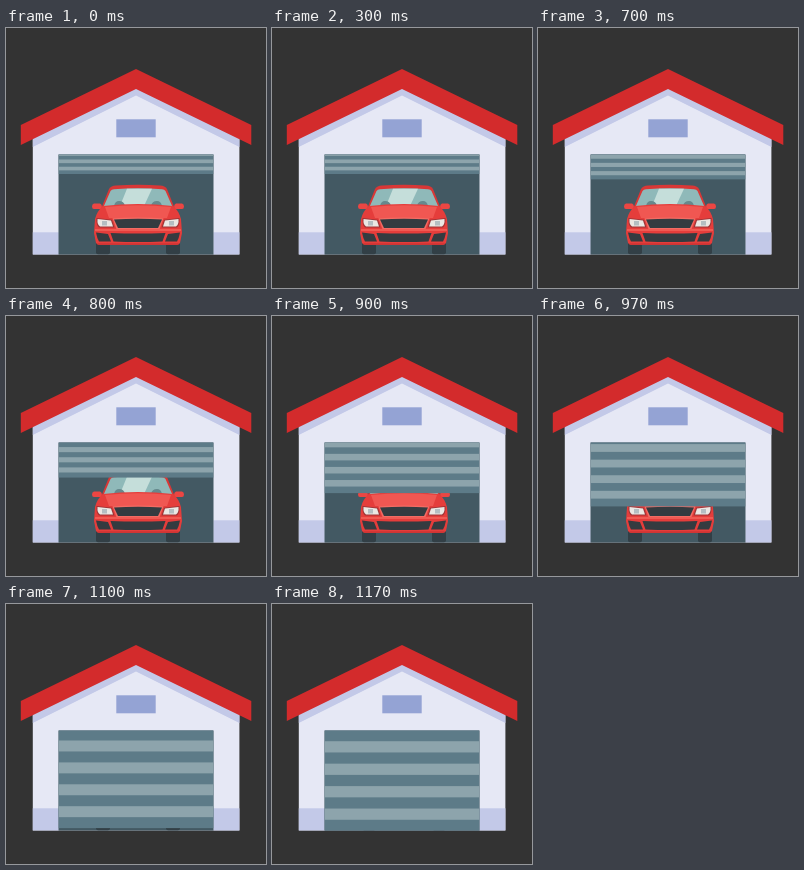
An HTML page with a canvas that plays this animation: 260 px wide and 260 px high, repeating every 2.21 s.

```html
<!DOCTYPE html>
<html lang="en">
<head>
<meta charset="utf-8">
<title>Garage door</title>
<style>
html, body { margin: 0; width: 100%; height: 100%; overflow: hidden; background: #333; }
canvas { display: block; width: 260px; height: 260px; }
</style>
</head>
<body>
<canvas id="stage"></canvas>
<script>
const SIZE = 260, LOOP = 2210, FPS = 30;
const OPENING = { x: 52.5, y: 126.5, w: 155, h: 100 };
const SLATS = 9, CAR_X = 132;

const canvas = document.getElementById('stage');
const ctx = canvas.getContext('2d');
const ratio = window.devicePixelRatio || 1;
canvas.width = canvas.height = SIZE * ratio;
ctx.scale(ratio, ratio);

function rect(color, x, y, w, h) {
  ctx.fillStyle = color;
  ctx.fillRect(x, y, w, h);
}

function shape(color, d) {
  ctx.fillStyle = color;
  ctx.fill(new Path2D(d));
}

// Draws a shape on both sides of the car's centre line.
function pair(color, d) {
  shape(color, d);
  ctx.save();
  ctx.translate(2 * CAR_X, 0);
  ctx.scale(-1, 1);
  shape(color, d);
  ctx.restore();
}

function drawHouse() {
  rect('#333333', 0, 0, SIZE, SIZE);
  shape('#e6e8f5', 'M26.8 226.4V110L130 58L233.4 110V226.4Z');
  shape('#c3c9e8', 'M26.8 110L130 58L233.4 110V119L130 67.5L26.8 119Z');
  shape('#d32b2c', 'M130 41L245.3 97V117L130 61L14.8 117V97Z');
  rect('#94a3d4', 110.3, 91.3, 39.4, 18);
  rect('#c3c9e8', 26.8, 204.3, 26, 22.1);
  rect('#c3c9e8', 207.4, 204.3, 26, 22.1);
  rect('#435963', OPENING.x, OPENING.y, OPENING.w, OPENING.h);
}

function drawCar() {
  // wheels
  pair('#323f46', 'M90 211H104V224.5Q104 226.3 102 226.3H92Q90 226.3 90 224.5Z');
  // mirrors
  pair('#b92c2e', 'M93 179L99 178V181L94 181Z');
  pair('#ec4643', 'M88 175.5H94Q96 176 96 179V181H88Q86 181 86 178.5Q86 176 88 175.5Z');
  // cabin
  shape('#d93736', 'M95 181L103 161Q105 158 110 157.6Q132 156 154 157.6Q159 158 161 161L169 181Z');
  shape('#8fb9b9', 'M97.5 179L104.5 163Q105.5 161.5 108 161.2Q132 159.5 156 161.2Q158.5 161.5 159.5 163L166.5 179Z');
  shape('#c5deda', 'M114 178L121 160.8H146L138 178Z');
  shape('#66898d', 'M108 178Q109 173 113 173Q118 173 119 178ZM145 178Q146 173 151 173Q155 173 156 178Z');
  // body
  shape('#e53d3b', 'M97 178Q132 174 167 178Q173 183 175 191L176 205L174 215Q173 217 170 217H94Q91 217 90 215L88 205L89 191Q91 183 97 178Z');
  shape('#f05752', 'M99 179Q132 175.5 165 179L161 190H103Z');
  // headlights
  pair('#9c3436', 'M90.5 190L106 191.7L108.5 199.5H93Q90 197 90.5 190Z');
  pair('#ebe7e3', 'M91.5 191L105 192.4L107 198.5H94Q91 196.5 91.5 191Z');
  pair('#b4bec2', 'M96 193H101V197.5H96Z');
  // grille
  shape('#f36b63', 'M106.5 190.2Q132 188.8 157.5 190.2L153.5 201H110.5Z');
  shape('#343b40', 'M108 191.5Q132 190.2 156 191.5L152 200H112Z');
  // bumper
  shape('#f05a53', 'M89 201H175V203H89Z');
  shape('#343b40', 'M104.5 205Q132 206 159.5 205L156.5 213.5Q132 214.5 107.5 213.5Z');
  pair('#343b40', 'M90 204.5L102 206L105 213.5H93Q91 210 90 204.5Z');
  shape('#cf3534', 'M91 215.3H173Q172.5 217 170 217H94Q91.5 217 91 215.3Z');
}

// The door starts at 558 ms and speeds up until it is shut.
function closed(ms) {
  const p = Math.min(1, Math.max(0, (ms - 558) / 552));
  return p * p;
}

// While it folds, the upper slats slide up behind the wall.
function drawDoor(amount) {
  const top = 113.4 + 12.6 * amount;
  const bottom = 146 + 81 * amount;
  const step = (bottom - top) / SLATS;
  ctx.save();
  ctx.beginPath();
  ctx.rect(OPENING.x, OPENING.y, OPENING.w, OPENING.h);
  ctx.clip();
  rect('#5d7b88', OPENING.x, top, OPENING.w, bottom - top);
  for (let i = 1; i < SLATS; i += 2) {
    rect('#8da4ac', OPENING.x, top + i * step, OPENING.w, step);
  }
  ctx.restore();
}

function draw(ms) {
  const tick = Math.floor((ms + 3.4) * FPS / 1000);
  drawHouse();
  drawCar();
  drawDoor(closed(tick * 1000 / FPS));
}

const start = performance.now();
function loop() {
  draw((performance.now() - start) % LOOP);
  requestAnimationFrame(loop);
}
loop();
</script>
</body>
</html>
```
